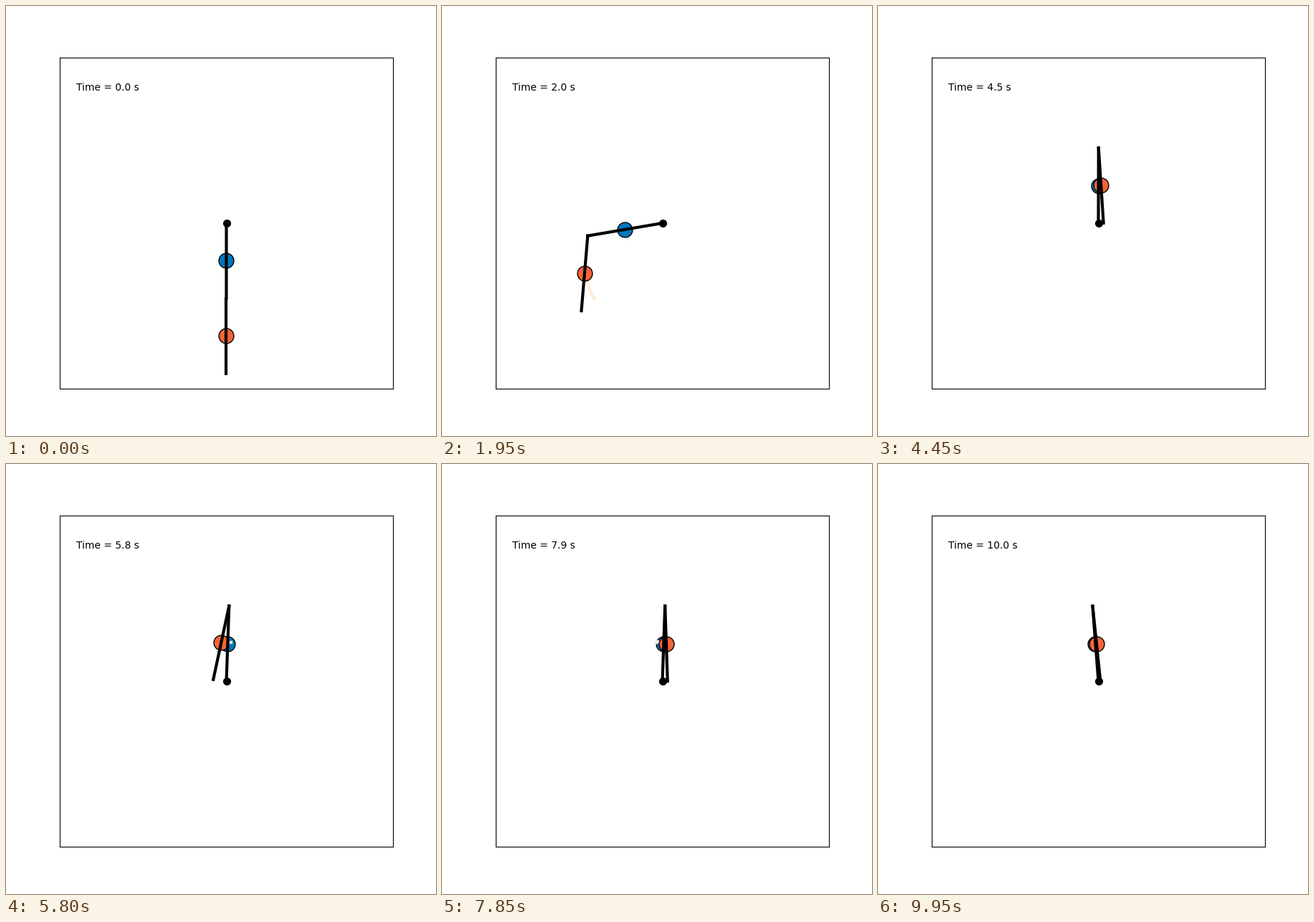
Recreate the animation shown at these times as a matplotlib script. Size 600 by 600 pixels, loop 10 s.

```python
import numpy as np
import matplotlib.pyplot as plt
from matplotlib.animation import FuncAnimation

FRAMES, DT = 200, 0.05
RATE, START, SOFT = 58.4, 0.575, 0.1   # swing-up speed (deg/s), start and easing (s)
OMEGA = 7.313                          # sway of the lower link (rad/s)
TRAIL1, TRAIL2 = 6, 8


def ramp(t, start):
    """Slope that eases in around start."""
    return RATE * SOFT * np.logaddexp(0, (t - start) / SOFT)


def direction(degrees):
    """Unit vector, measured from hanging down towards the left."""
    a = np.radians(degrees)
    return np.array([-np.sin(a), -np.cos(a)])


t = np.arange(FRAMES) * DT

# The upper link turns to the top at a steady rate; the lower one leans outward
turn = ramp(t, START) - ramp(t, START + 180 / RATE)
a = np.radians(turn)
lean = 7 * np.sin(a) * (1 - np.cos(a))
kick = 6.7 * np.exp(-t) * np.sin(OMEGA * t)

# Near the top the lower link sways wider and wider; the upper one counters it
sway = 24 * (1 - np.exp(-np.maximum(t - 3.2, 0) / 2.2))
phase = 0.36 + OMEGA * (t - 4.45)

link1 = direction(turn - 0.31 * sway * np.sin(phase - 0.4))
link2 = direction(lean - kick - sway * np.sin(phase))
joint, tip = link1, link1 + link2
mass1, mass2 = link1 / 2, link1 + link2 / 2

fig = plt.figure(figsize=(6, 6), dpi=100)
ax = fig.add_subplot(xlim=(-2.2, 2.2), ylim=(-2.2, 2.2), xticks=[], yticks=[])


def mass_line(trail, face):
    return ax.plot([], [], "o-", color=trail, lw=3, markersize=15, markevery=10000,
                   markerfacecolor=face, markeredgecolor="k")[0]


tail1 = mass_line("#d2eeff", "#0077BE")
tail2 = mass_line("#ffebd8", "#f66338")
rod2, = ax.plot([], [], "k-", lw=3)
rod1, = ax.plot([], [], "k-", lw=3)
ax.plot([0], [0], "ko", markersize=7)
clock = ax.text(0.05, 0.9, "", transform=ax.transAxes)


def recent(path, i, count):
    """The last few points of a path, newest first."""
    return path[:, max(0, i - count + 1):i + 1][:, ::-1]


def animate(i):
    tail1.set_data(*recent(mass1, i, TRAIL1))
    tail2.set_data(*recent(mass2, i, TRAIL2))
    rod2.set_data([joint[0, i], tip[0, i]], [joint[1, i], tip[1, i]])
    rod1.set_data([joint[0, i], 0], [joint[1, i], 0])
    clock.set_text("Time = %.1f s" % (i * DT))
    return tail1, tail2, rod2, rod1, clock


anim = FuncAnimation(fig, animate, frames=FRAMES, interval=50, repeat=True, repeat_delay=0)
plt.show()
```
